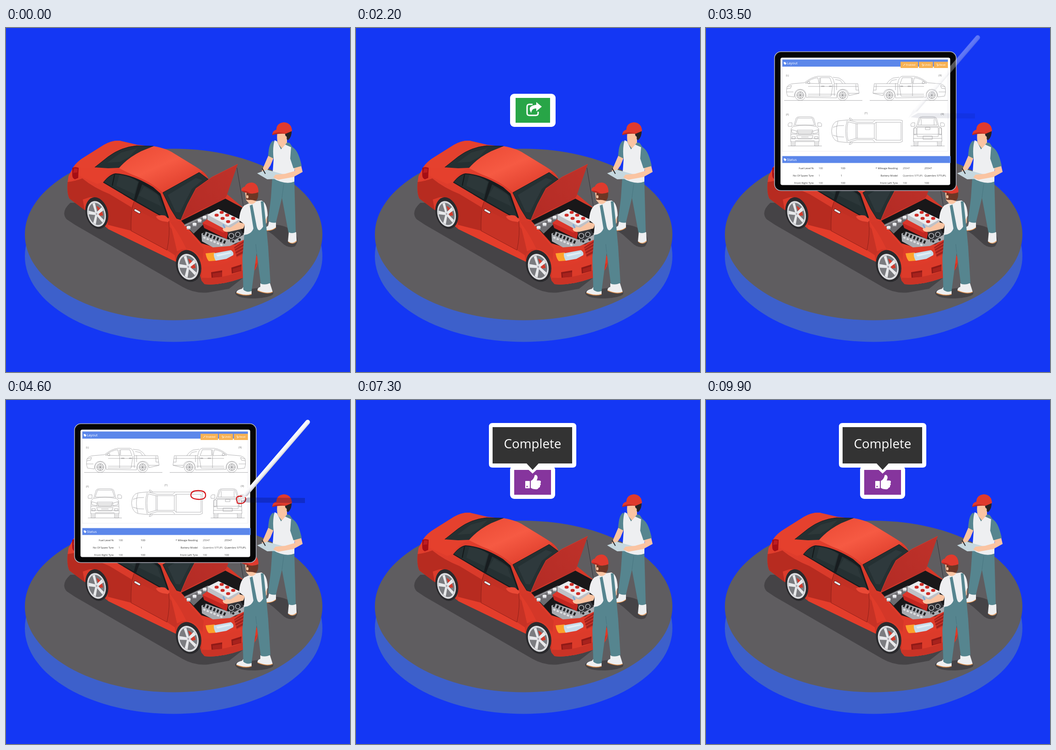
An HTML page that plays this animation: 748 by 748 pixels, repeating every 10000 ms.

```html
<!DOCTYPE html>
<html lang="en">
<head>
<meta charset="utf-8">
<title>Vehicle inspection</title>
<style>
html, body { margin: 0; width: 100%; height: 100%; overflow: hidden; background: #1437f4; }
svg { display: block; width: 100vw; height: 100vh; }
text { font-family: "Open Sans", "Noto Sans", sans-serif; }
.teal { fill: #56858f; }
.white { fill: #eeeff1; }
.skin { fill: #fac4a2; }
.cap { fill: #e03a2d; }
.glass { fill: #253032; }
.shade { fill: #454346; }
.line { fill: none; stroke: #8b8b8e; stroke-width: .65; }
.form { font-size: 5.7px; fill: #333; }
.form .label { text-anchor: end; }
.form .field { font-size: 5.3px; fill: #555; }
.ink { fill: none; stroke: #d6171b; stroke-width: 2.3; stroke-dasharray: 1; }

.share, .thumb, .tip, .tablet, .bezel, .pencil, .ink { animation: 10s linear infinite both; }
.share { animation-name: share; }
.thumb { animation-name: thumb; }
.tip { animation-name: tip; }
.tablet { animation-name: tablet; }
.bezel { animation-name: bezel; }
.pencil { animation-name: pencil; }
.ink1 { animation-name: ink1; }
.ink2 { animation-name: ink2; }

@keyframes share {
  0%, 9% { opacity: 0; transform: translateY(-29px); animation-timing-function: ease-out; }
  13%, 22.5% { opacity: 1; transform: none; }
  26.5%, 100% { opacity: 0; transform: none; }
}
@keyframes thumb {
  0%, 54.5% { opacity: 0; transform: translateY(-29px); animation-timing-function: ease-out; }
  58.5%, 100% { opacity: 1; transform: none; }
}
@keyframes tip {
  0%, 64% { opacity: 0; transform: translateY(22px); animation-timing-function: ease-out; }
  69%, 100% { opacity: 1; transform: none; }
}
@keyframes tablet {
  0%, 28% { opacity: 0; transform: translateY(-360px); }
  29% { opacity: .36; transform: translateY(-334px); animation-timing-function: ease-out; }
  34%, 51% { opacity: 1; transform: none; }
  55%, 100% { opacity: 0; transform: translateY(-33px); }
}
@keyframes bezel { 0%, 29% { fill-opacity: 0; } 32%, 100% { fill-opacity: 1; } }
@keyframes ink1 { 0%, 37% { stroke-dashoffset: 1; } 40.5%, 100% { stroke-dashoffset: 0; } }
@keyframes ink2 { 0%, 43% { stroke-dashoffset: 1; } 46%, 100% { stroke-dashoffset: 0; } }
@keyframes pencil {
  0%, 34% { opacity: 0; transform: translate(-45px, -34px); }
  37% { opacity: 1; transform: translate(-105px, -14px); }
  37.9% { transform: translate(-89px, -24px); }
  38.8% { transform: translate(-73px, -14px); }
  39.7% { transform: translate(-89px, -4px); }
  40.5% { transform: translate(-105px, -14px); animation-timing-function: ease-in-out; }
  43% { transform: translate(-3px, 1px); }
  43.8% { transform: translate(3px, -12px); }
  44.7% { transform: translate(14px, -4px); }
  45.4% { transform: translate(3px, 4px); }
  46%, 48% { opacity: 1; transform: none; animation-timing-function: ease-in; }
  51%, 100% { opacity: 0; transform: translate(69px, -15px); }
}
</style>
</head>
<body>
<svg viewBox="0 0 748 748">
<defs>
  <linearGradient id="roof" x1="0" y1="0" x2=".8" y2="1"><stop offset="0" stop-color="#ea4833"/><stop offset=".5" stop-color="#f65a43"/><stop offset="1" stop-color="#dc3b2a"/></linearGradient>
  <linearGradient id="side" x1="0" y1="0" x2=".35" y2="1"><stop offset=".2" stop-color="#e23e2d"/><stop offset="1" stop-color="#cb3325"/></linearGradient>
  <linearGradient id="door" x1="0" y1="0" x2="1" y2="1"><stop offset="0" stop-color="#bf2f23"/><stop offset="1" stop-color="#c83225"/></linearGradient>
  <linearGradient id="hood" x1="0" y1="1" x2="1" y2="0"><stop offset="0" stop-color="#b32b25"/><stop offset="1" stop-color="#bf322a"/></linearGradient>
  <linearGradient id="barrel" gradientUnits="userSpaceOnUse" x1="584" y1="124" x2="592" y2="131"><stop offset=".1" stop-color="#fff"/><stop offset=".6" stop-color="#f0f0f4"/><stop offset="1" stop-color="#bfc1cb"/></linearGradient>
  <clipPath id="field"><path d="M426 312h45v15h-45z"/></clipPath>

  <path id="spoke" d="M-2.800 0L-4-24H4L2.800 0z" fill="#e8e9eb"/>
  <g id="wheel">
    <circle r="35" fill="#2a2a2d"/>
    <g transform="translate(-1.500 1.500)">
      <circle r="28.500" fill="#dcdde0"/>
      <circle r="24.500" fill="#7b7c80"/>
      <path d="M6-17Q20-10 19 7L8 6z" fill="#d23a2c"/>
      <use href="#spoke"/><use href="#spoke" transform="rotate(72)"/><use href="#spoke" transform="rotate(144)"/>
      <use href="#spoke" transform="rotate(216)"/><use href="#spoke" transform="rotate(288)"/>
      <circle r="5.500" fill="#e2e3e6"/><circle r="2.300" fill="#aaabb0"/>
    </g>
  </g>

  <g id="disc" class="line">
    <circle r="11.500"/><circle r="7.500" stroke-width="1"/><circle r="5"/><circle r="1.800"/>
    <path d="M0-7.500V7.500M-7.500 0H7.500M-5.300-5.300L5.300 5.300M-5.300 5.300L5.300-5.300"/>
  </g>
  <g id="truck" class="line">
    <path d="M192 150L177 148 175 139 176 128Q180 122 190 121L214 119Q229 107 243 105L270 105Q277 107 279 121L330 121 332 136 333 142 311 147M218 151L284 152M192 150Q192 133 205 133T218 151M284 152Q284 133 297 133T311 147"/>
    <path d="M276 107L290 109Q299 114 303 121M281 112L292 114 297 121M279 121V148"/>
    <path d="M216 120Q230 109 243 108L246 121ZM249 108V121H274L269 108zM247 108V148M276 122L272 148H221M222 127H331M284 120V135M177 128L186 125 184 131 176 132M175 139H190M326 122V135H332"/>
    <path d="M251 126h6v1.500h-6zM268 126h5v1.500h-5zM222 121q-4-5 3-5l1 5zM222 144H282M311 142H332"/>
    <use href="#disc" x="205" y="146"/><use href="#disc" x="297" y="146"/>
    <path d="M170 157.500H340"/>
  </g>
  <g id="ends" class="line">
    <path d="M-24 213L-19 196Q-17 193-11 193H11Q17 193 19 196L24 213 30 219 31 247H-31L-30 219Z"/>
    <path d="M-21 211L-16 196H16L21 211ZM-28 214h-8q-2-7 3-8h5zM28 214h8q2-7-3-8h-5zM-30 231H30M-31 240H31M-30 247v9h9v-9M30 247v9h-9v-9M-29 250h7M-29 253h7M22 250h7M22 253h7"/>
    <path d="M-37 256.500H37"/>
  </g>
</defs>

<path d="M0 0H748V748H0z" fill="#1437f4"/>
<ellipse cx="364.500" cy="496" rx="323.500" ry="186.500" fill="#3d60cb"/>
<ellipse cx="364.500" cy="449" rx="323.500" ry="186.500" fill="#5f5d60"/>

<g id="car">
  <path class="shade" d="M140 380Q118 400 132 416L150 428 384 563Q410 578 440 575L485 567 545 520 300 380z"/>
  <path d="M134 335L136 322 146 303Q154 290 173 279L213 254Q230 244 247 245L286 254Q338 259 364 272L413 302Q436 315 440 328L515 390 522 455 546 497Q550 515 540 527L515 543Q470 560 432 557L425 549 418 525 369 508 222 437 172 396 138 371Q132 360 134 335Z" fill="url(#side)"/>
  <path d="M148 301Q156 289 175 278L213 254Q230 244 247 245L283 256Q248 264 225 281L193 303Q170 307 148 301Z" fill="#e5412e"/>
  <path d="M148 301Q170 307 193 303L246 305Q226 310 210 335L198 339 157 320Z" fill="#e5402d"/>
  <path d="M134 335Q150 333 166 327 190 347 225 361L273 390 273 441 222 429Q215 365 182 368L167 373 171 396 138 371Q132 360 134 335Z" fill="#b72b20"/>
  <path d="M273 390L279 376 354 420 355 432 350 483 272 441Z" fill="url(#door)"/>
  <path d="M273 390L355 432 372 448Q405 476 390 481 371 481 365 501L350 483 272 441Z" fill="#c63225"/>
  <path d="M222 428L272 441 350 483 367 494 369 508 222 437Z" fill="#e43d2b"/>
  <path d="M144 304Q151 301 158 304L157 326 150 329Q144 327 144 319Z" fill="#a60e15"/>
  <path d="M148 305L156 306 155 314 146 315Z" fill="#c01c20"/>

  <path class="glass" d="M193 303L222 280Q250 259 284 256L321 257 294 268Q264 283 246 304L222 305Z"/>
  <path d="M193 303L222 280Q250 259 284 256L321 257" fill="none" stroke="#151b1d"/>
  <path d="M220 293L250 271 286 261 268 280 248 291z" fill="#2d3839"/>
  <path d="M246 305Q264 283 294 268L321 257Q350 262 364 272L413 302 427 312 340 357Q315 334 275 319 260 312 246 305Z" fill="url(#roof)"/>
  <path d="M211 336Q225 318 238 316 275 318 320 346L336 360 354 412 350 417 278 376Z" fill="#171c1f"/>
  <path class="glass" d="M213 335Q226 319 239 318 265 319 289 334L278 373Z"/>
  <path d="M236 319L231 343" stroke="#141819" stroke-width="2"/>
  <path class="glass" d="M296 340Q322 353 334 365L351 412 344 411 283 376Z"/>
  <path d="M246 320Q270 322 287 335L279 361 240 343zM300 345L329 362 338 388 288 364z" fill="#2c3739"/>
  <path class="glass" d="M341 358L420 314 440 329 413 349 381 417 371 414 358 393Z" stroke="#151b1d"/>
  <path d="M352 363L413 326 427 331 404 350 378 401 369 400z" fill="#2e393c"/>
  <path d="M326 410Q334 405 346 408L356 417 353 422 340 420Q329 417 326 410Z" fill="#ea4936"/>
  <path d="M279 376Q271 394 272 441L350 483Q357 450 354 420" fill="none" stroke="#8f2119"/>
  <path d="M281 396L290 401" stroke="#741a16" stroke-width="6" stroke-linecap="round"/>
  <path d="M281 396L290 401" stroke="#e6e7ea" stroke-width="4" stroke-linecap="round"/>

  <path d="M356 421L376 418 390 431 425 470 498 472 520 458 546 497Q550 515 540 527L515 543Q470 560 432 557L425 548Q429 495 393 481 382 480 372 486 364 450 356 421Z" fill="#df3b2a"/>
  <path d="M356 421L377 419 430 480 427 505Q413 482 392 480 375 444 356 421Z" fill="#d43728"/>
  <path d="M427 519Q460 520 497 503L547 499Q550 515 540 527L515 543Q470 560 432 557L425 549z" fill="#dc3b2a"/>
  <path d="M426 543Q470 546 510 529L546 511 540 527 515 543Q470 560 432 557L425 549z" fill="#c93326"/>
  <path d="M446 531L470 527V541L447 543zM490 521L512 514V528L491 534z" fill="#8f1a17"/>
  <path d="M449 534L470 531V541L450 542zM493 524L512 518V527L494 532z" fill="#a8221d"/>
  <path d="M496 477L522 459 529 485 502 499Z" fill="#a3221c"/>
  <path d="M497 480L523 465M498 486L525 471M500 492L527 477M502 498L529 484" stroke="#d63d2f" stroke-width="1.500"/>
  <path d="M434 490L454 488 456 506 441 507Q436 502 434 490Z" fill="#ffa22a"/>
  <path d="M452 490L489 483Q496 487 494 494L479 502 456 506Q451 497 452 490Z" fill="#c6dcea"/>
  <path d="M457 493L487 487 490 490 460 497z" fill="#e2eef5"/>

  <path d="M381 419L477 371 516 392 521 455 499 470 451 476 425 468Z" fill="#191719"/>
  <path d="M388 427L440 403 443 414 408 447z" fill="#6d6c70"/>
  <path d="M388 430L437 407" stroke="#99999d" stroke-width="2"/>
  <g fill="#b9bbc0">
    <path d="M393 434h8v4h-8zM406 427h8v4h-8zM417 419h8v4h-8zM428 412h8v4h-8z"/>
    <g fill="#f0f0f2"><ellipse cx="397" cy="433" rx="4.500" ry="2.800"/><ellipse cx="410" cy="426" rx="4.500" ry="2.800"/><ellipse cx="421" cy="418" rx="4.500" ry="2.800"/><ellipse cx="432" cy="411" rx="4.500" ry="2.800"/></g>
  </g>
  <path d="M425 447L435 443 484 460 518 446 518 460 487 474 450 477 426 464Z" fill="#a9abb0"/>
  <path d="M427 424L440 414 485 437 480 459 431 435Z" fill="#c22620"/>
  <path d="M427 424L440 414 485 437 473 445Z" fill="#dc372c"/>
  <path d="M438 406L462 394 508 416V427L483 441 438 417Z" fill="#bfc1c6"/>
  <path d="M438 406L462 394 508 416 483 430Z" fill="#ebecee"/>
  <g fill="#ce2c27"><ellipse cx="458" cy="407" rx="4.500" ry="3.300"/><ellipse cx="469" cy="401" rx="4.500" ry="3.300"/><ellipse cx="471" cy="414" rx="4.500" ry="3.300"/><ellipse cx="481" cy="407" rx="4.500" ry="3.300"/><ellipse cx="483" cy="421" rx="4.500" ry="3.300"/><ellipse cx="494" cy="414" rx="4.500" ry="3.300"/></g>
  <path d="M429 446L477 466" stroke="#202124" stroke-width="7" stroke-dasharray="4 4"/>
  <path d="M429 455L472 473" stroke="#dfe0e3" stroke-width="4" stroke-dasharray="5 3"/>
  <path d="M481 443L507 432 517 449 489 466Z" fill="#333438"/>
  <g fill="#27282b" stroke="#b4b6bb" stroke-width="1.600"><circle cx="490" cy="452" r="5.500"/><circle cx="504" cy="449" r="5"/><circle cx="494" cy="464" r="3.500"/><circle cx="508" cy="460" r="3.500"/></g>

  <path d="M502 304L516 387" stroke="#333238"/>
  <path d="M380 418L395 383 413 349 448 324 504 296 480 364Q478 370 468 375L418 398Z" fill="url(#hood)"/>
  <path d="M380 418L395 383 413 349 448 324 504 296" fill="none" stroke="#d63b2d"/>
  <use href="#wheel" transform="translate(197.500 402.500) rotate(-15) scale(.69 1)"/>
  <use href="#wheel" transform="translate(397 517.500) rotate(-17) scale(.77 1.010)"/>
</g>

<g id="clerk">
  <path class="shade" d="M564 438L589 428Q615 430 631 450 638 463 628 475 613 480 600 467L580 449z"/>
  <path class="white" d="M572 421L587 423 587 434Q578 442 563 440 561 435 570 430zM615 443L631 444 632 464Q624 473 613 464z"/>
  <path d="M563 440Q578 442 587 434M614 465Q623 472 632 463" fill="none" stroke="#d98b4a" stroke-width="1.500"/>
  <path class="teal" d="M579 326L627 334 630 444Q622 448 614 444L600 369 587 423Q577 425 570 419L576 370Z"/>
  <path d="M600 369L604 339" stroke="#497681"/>
  <path class="skin" d="M571 276L583 280 575 299 564 315 556 311z"/>
  <path class="teal" d="M582 245Q572 247 570 278L582 284 588 265z"/>
  <path class="white" d="M584 244L600 251 620 256 628 268 627 334Q607 342 579 326L582 285Q579 262 584 244z"/>
  <path class="teal" d="M589 246L598 264 606 253 624 261 617 250 598 246z"/>
  <path class="skin" d="M590 227L611 230 611 249 600 262 592 252Q588 244 590 227z"/>
  <path d="M606 227L621 222Q622 237 613 244L609 240z" fill="#262326"/>
  <ellipse class="skin" cx="608" cy="239" rx="2.500" ry="4"/>
  <path class="cap" d="M579 231Q580 223 588 221 588 207 604 205 621 206 622 224L608 230Q592 227 579 231z"/>
  <path d="M579 231Q591 224 608 230 592 229 579 233z" fill="#b92920"/>
  <path d="M546 316L567 308 607 319 592 328 568 329Z" fill="#c6d8df"/>
  <path class="skin" d="M626 299L642 300 645 313 625 324 592 330 581 325 586 319 607 317 628 311z"/>
  <path class="teal" d="M620 258Q635 262 643 300L625 305 618 284z"/>
  <path d="M557 305L564 317" stroke="#26262a" stroke-width="2"/>
</g>

<g id="mechanic">
  <path class="shade" d="M498 576Q502 564 535 567L565 563Q586 570 580 580 565 588 535 588 502 588 498 576z"/>
  <path class="white" d="M517 562L534 565 534 579Q520 584 501 576 500 570 513 567zM553 555L574 555 580 574Q570 580 547 571 546 565 553 563z"/>
  <path d="M501 576Q519 584 534 579M547 571Q568 580 580 574" fill="none" stroke="#d98b4a" stroke-width="1.700"/>
  <path class="skin" d="M555 406L568 404 567 423 560 436z"/>
  <path class="skin" d="M506 422L520 426 516 436 486 443Q473 445 471 437L476 432 488 434z"/>
  <path d="M472 427L476 435" stroke="#7fa8d8" stroke-width="3.500"/>
  <path class="white" d="M518 386Q535 377 555 375 568 379 569 408L560 425 560 449 517 451 519 427 507 418Q508 395 518 386z"/>
  <path class="teal" d="M518 450Q534 448 538 436L530 386 536 384 545 431Q549 448 559 432L554 377 560 377 566 431 570 475 575 554Q564 560 554 556L545 488 534 572Q524 576 516 569L514 500Z"/>
  <path d="M545 488L543 470" stroke="#497681"/>
  <path class="skin" d="M520 357L543 360 544 377Q536 386 528 381L522 374z"/>
  <path d="M523 358L548 355Q550 371 543 376 534 373 529 374L522 373z" fill="#6c3625"/>
  <ellipse class="skin" cx="525" cy="367" rx="2.300" ry="3.500"/>
  <path class="cap" d="M512 354Q511 347 519 345 523 336 535 336 549 338 549 357 538 362 526 359 518 354 512 354z"/>
  <path d="M512 354Q523 353 530 359 519 359 512 354z" fill="#b92920"/>
</g>

<g class="share">
  <rect x="335" y="143" width="99" height="72" rx="9" fill="#fff"/>
  <path d="M347 152h75v54h-75z" fill="#28a547"/>
  <path d="M384 166H377Q372 166 372 171V185Q372 190 377 190H391Q396 190 396 185V182" fill="none" stroke="#fff" stroke-width="3"/>
  <path d="M392 161L404 171 392 181V175Q382 174 381 185 371 169 392 167z" fill="#fff"/>
</g>

<g class="thumb">
  <rect x="335" y="143" width="98" height="72" rx="9" fill="#fff"/>
  <path d="M344 152h80v54h-80z" fill="#86359d"/>
  <path d="M369 176h8q1 0 1 1v14q0 1-1 1h-8q-1 0-1-1v-14q0-1 1-1zM380 176Q386 173 388 166 388 162 392 163 397 166 393 175H399Q404 176 401 181 403 184 400 186 401 190 397 191 395 195 390 194 384 194 380 191z" fill="#fff"/>
  <circle cx="372" cy="188" r="1.600" fill="#86359d"/>
</g>

<g class="tip">
  <path d="M297 50H471Q479 50 479 58V139Q479 147 471 147H398L384 160 370 147H297Q289 147 289 139V58Q289 50 297 50z" fill="#fff"/>
  <path d="M297 59H470V138H397L384 152 371 138H297z" fill="#333"/>
  <text x="384" y="105" font-size="27.700" fill="#fff" text-anchor="middle">Complete</text>
</g>

<g class="tablet">
  <rect class="bezel" x="149" y="51.500" width="395" height="302" rx="14" fill="#050506" stroke="#aeb0bd" stroke-width="1.600"/>
  <rect x="162" y="64.500" width="369" height="277" rx="4" fill="#fff"/>
  <path d="M166 68.500H526V84H166zM166 278.500H532V293.500H166z" fill="#5c87ea"/>
  <path d="M166 84V268H526V84" fill="none" stroke="#e4e6eb" stroke-width=".7"/>
  <path d="M169 74h3l3 3-3 3-3-3zM169 283.500h3l3 3-3 3-3-3z" fill="#fff"/>
  <g fill="#fff" font-size="7.300"><text x="176" y="79">Layout</text><text x="176" y="288.500">Status</text></g>
  <path d="M423 73.500h38v13.500h-38zM463 73.500h30.500v13.500h-30.500zM495.500 73.500h30.500v13.500h-30.500z" fill="#f8b254"/>
  <g fill="#fff" font-size="5.400"><text x="435" y="82">Enabled</text><text x="475" y="82">Undo</text><text x="507" y="82">Reset</text></g>
  <path d="M429 82l4-4M469 79q4-2 4 3h-3M501 79q4-2 4 3h-3" fill="none" stroke="#fff"/>
  <g fill="#777" font-size="6" text-anchor="middle"><text x="177" y="105">(L)</text><text x="509" y="105">(R)</text><text x="177" y="190">(F)</text><text x="348" y="187">(T)</text><text x="514" y="189">(R)</text></g>

  <use href="#truck"/>
  <use href="#truck" transform="matrix(-1 0 0 1 696 0)"/>
  <g transform="translate(215)">
    <use href="#ends"/>
    <path class="line" d="M-24 214Q0 209 24 214M-29 221L-18 224-17 230-28 228zM29 221L18 224 17 230 28 228zM-17 222H17L14 231H-14zM-16 225H16M-15 228H15M-18 234H18L15 241H-15zM-8 237H8M-28 236h7v5h-7zM21 236h7v5h-7zM-21 245H21"/>
  </g>
  <g transform="translate(482)">
    <use href="#ends"/>
    <path class="line" d="M-25 214H25M-23 216V236H23V216zM-30 217h5v15h-5zM25 217h5v15h-5zM-5 216h10v5h-10zM-10 235h20v7h-20zM-14 211V198M14 211V198"/>
  </g>
  <g class="line">
    <path d="M427 201L421 200H306L287 202Q274 205 273 224 274 243 287 247L306 249H421L427 247z"/>
    <path d="M307 201Q300 224 307 248M287 203Q280 224 287 246M309 204L326 208V240L309 245Q304 224 309 204zM326 208H366V240H326M370 205V244H424V205zM366 208L370 205M366 240L370 244M312 201L328 205H363L367 201M312 248L328 243H363L367 248M276 216Q287 211 300 212M276 233Q287 238 300 237M315 200l-4-4h4l4 4M315 249l-4 4h4l4-4M329 208V240"/>
  </g>

  <g class="form">
    <g class="label"><text x="234" y="306.500">Fuel Level %</text><text x="234" y="322.500">No Of Spare Tyre</text><text x="234" y="338.500">Front Right Tyre</text><text x="417" y="306.500">* Mileage Reading</text><text x="417" y="322.500">Battery Model</text><text x="417" y="338.500">Front Left Tyre</text></g>
    <g class="field"><text x="245" y="307">100</text><text x="245" y="323">1</text><text x="245" y="339">100</text><text x="428" y="307">25547</text><text x="428" y="323" clip-path="url(#field)">Quembro 57TUPL</text><text x="428" y="339">100</text></g>
    <text x="293" y="306.500">100</text><text x="293" y="322.500">1</text><text x="293" y="338.500">100</text><text x="475" y="306.500">25547</text><text x="475" y="322.500">Quembro 57TUPL</text><text x="475" y="338.500">100</text>
  </g>
  <path class="ink ink1" pathLength="1" d="M402 207Q402 197 418 197T434 207 418 216 402 207"/>
  <path class="ink ink2" pathLength="1" d="M503 222Q497 209 510 209T521 217 510 225 503 222"/>
</g>

<g class="pencil">
  <path d="M510 221L526 212 650 213V224L526 223z" fill="#070d45" opacity=".25"/>
  <path d="M505 223L518 202 525 208z" fill="#e7e8ed"/>
  <path d="M522 204L656 48" stroke="url(#barrel)" stroke-width="10" stroke-linecap="round"/>
</g>
</svg>
</body>
</html>
```
